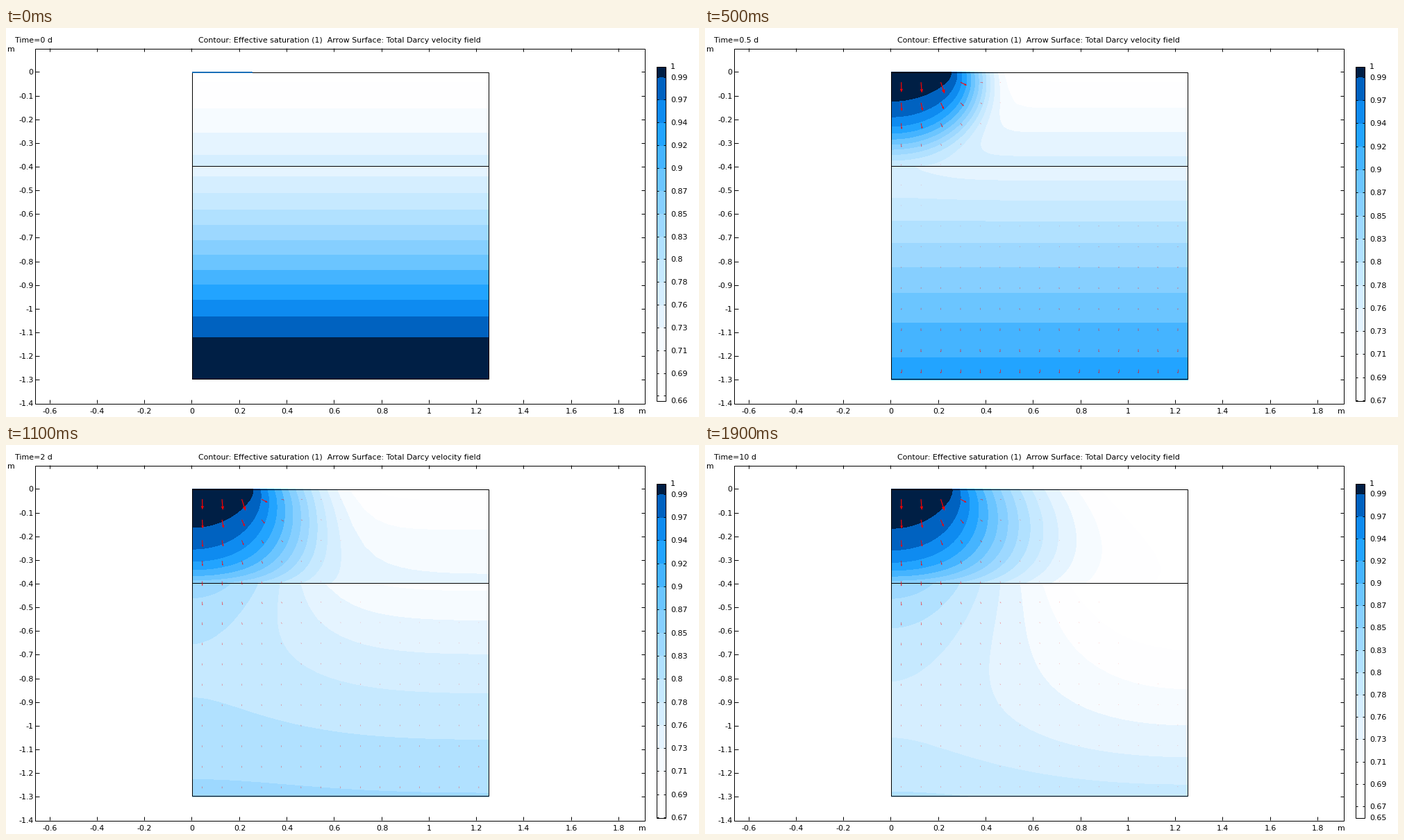
These frames come from a looping animation (998x561 px, 2 s). A matplotlib script:

```python
import numpy as np
import matplotlib
import matplotlib.pyplot as plt
from matplotlib.animation import FuncAnimation
from matplotlib.collections import LineCollection, PolyCollection
from matplotlib.patches import Rectangle

matplotlib.rcParams["font.family"] = "DejaVu Sans"
W, H = 998, 561
X0, Y0, PX = 268.4, 64.4, 341.4          # stage position of the origin, pixels per metre
LEVELS = 0.989 - 0.0231 * np.arange(15)
COLORS = ["#001f45", "#0062c0", "#0e8bf0", "#22a4ff", "#45b4ff", "#6bc5ff", "#86cfff", "#9dd8ff",
          "#b1e1ff", "#c6e9ff", "#d5eeff", "#e5f4ff", "#f6fbff", "#fefeff", "#ffffff", "#ffffff"]
TIMES = np.concatenate([np.arange(11) / 10, np.arange(2, 11)])

# --- variably saturated flow in a two-layer cylinder under a ring of ponded water ---
TOP = 28
dz = np.r_[np.full(TOP, 0.4 / TOP), np.full(24, 0.9 / 24)][:, None]
dr = np.r_[np.full(28, 0.25 / 14), np.full(15, 0.05)]
zf = np.r_[0, np.cumsum(dz[:, 0])]
rf = np.r_[0, np.cumsum(dr)]
zc, rc = (zf[1:] + zf[:-1]) / 2, (rf[1:] + rf[:-1]) / 2
NZ, NR = len(zc), len(rc)
depth = zc[:, None]
area = rc * dr
upper = depth < 0.4
ring = rc < 0.25


def soil(up, low):
    return np.where(upper, up, low)


KS, POR = soil(0.06, 0.19), soil(0.399, 0.339)
ALPHA, N = soil(1.40, 1.39), soil(1.5, 1.6024)
M = 1 - 1 / N
STORE = 0.004


def saturation(h, alpha, n):
    return (1 + (alpha * np.maximum(-h, 0)) ** n) ** (1 / n - 1)


def conductivity(h):
    s = saturation(h, ALPHA, N)
    return KS * np.sqrt(s) * (1 - (1 - s ** (1 / M)) ** M) ** 2


def water(h):
    return POR * saturation(h, ALPHA, N) + STORE * h


def capacity(h):
    a = ALPHA * np.maximum(-h, 0)
    return POR * M * N * ALPHA * a ** (N - 1) * (1 + a ** N) ** (-M - 1) + STORE


def fluxes(h):
    """Face fluxes down and outward, each with its slopes for the cells on both sides."""
    k, head = conductivity(h), h - depth
    dk = (conductivity(h + 0.004) - conductivity(h - 0.004)) / 0.008
    z, za, zb = np.zeros((3, NZ + 1, NR))
    r, ra, rb = np.zeros((3, NZ, NR + 1))

    gap, drop = dz[1:] + dz[:-1], head[:-1] - head[1:]
    t = (k[1:] + k[:-1]) / gap
    z[1:-1], za[1:-1], zb[1:-1] = t * drop, t + dk[:-1] * drop / gap, -t + dk[1:] * drop / gap

    gap, drop = dr[1:] + dr[:-1], head[:, :-1] - head[:, 1:]
    t = (k[:, 1:] + k[:, :-1]) / gap
    r[:, 1:-1], ra[:, 1:-1], rb[:, 1:-1] = t * drop, t + dk[:, :-1] * drop / gap, -t + dk[:, 1:] * drop / gap

    t = (KS[0] + k[0]) / dz[0]
    z[0] = np.where(ring, -t * head[0], 0)
    zb[0] = np.where(ring, -t - dk[0] * head[0] / dz[0], 0)
    leak = 0.066 * (head[-1] + 2.0)
    z[-1] = np.clip(leak, 0, 0.029)
    za[-1] = np.where((leak > 0) & (leak < 0.029), 0.066, 0)
    return z, za, zb, r, ra, rb


def block_solve(diag, left, right, up, down, rhs):
    """Block tridiagonal elimination, one block per row of cells."""
    i = np.arange(NR)
    mat = np.zeros((NZ, NR, NR))
    mat[:, i, i] = diag
    mat[:, i[1:], i[:-1]] = left[:, 1:]
    mat[:, i[:-1], i[1:]] = right[:, :-1]
    x, inv = rhs.copy(), [np.linalg.inv(mat[0])]
    for n in range(1, NZ):
        w = up[n][:, None] * inv[-1]
        x[n] -= w @ x[n - 1]
        inv.append(np.linalg.inv(mat[n] - w * down[n - 1]))
    x[-1] = inv[-1] @ x[-1]
    for n in range(NZ - 2, -1, -1):
        x[n] = inv[n] @ (x[n] - down[n] * x[n + 1])
    return x


def advance(h, dt):
    start = water(h)
    for _ in range(4):
        z, za, zb, r, ra, rb = fluxes(h)
        fz, fr = dt / dz, dt / area
        r, ra, rb = rf * r, rf * ra, rf * rb
        rhs = start - water(h) + fz * (z[:-1] - z[1:]) + fr * (r[:, :-1] - r[:, 1:])
        diag = capacity(h) + fz * (za[1:] - zb[:-1]) + fr * (ra[:, 1:] - rb[:, :-1])
        step = block_solve(diag, -fr * ra[:, :-1], fr * rb[:, 1:], -fz * za[:-1], fz * zb[1:], rhs)
        h = h + np.clip(step, -0.5, 0.5)
    return h


def simulate():
    h = np.repeat(depth - 1.2, NR, axis=1)
    states = [h]
    for span in np.diff(TIMES):
        for _ in range(6):
            h = advance(h, span / 6)
        states.append(h)
    return states


STATES = simulate()


def layers(h):
    """Saturation of both layers, extended to their edges."""
    k, head = conductivity(h), h - depth
    a, b = k[TOP - 1] / dz[TOP - 1], k[TOP] / dz[TOP]
    mid = (a * head[TOP - 1] + b * head[TOP]) / (a + b) + 0.4
    top = np.where(ring, 0, head[0])
    base = 1.5 * h[-1] - 0.5 * h[-2]
    r = np.r_[0, rc, 1.25]
    for rows, z, alpha, n in (([top, *h[:TOP], mid], np.r_[0, zc[:TOP], 0.4], 1.40, 1.5),
                              ([mid, *h[TOP:], base], np.r_[0.4, zc[TOP:], 1.3], 1.39, 1.6024)):
        s = saturation(np.pad(np.array(rows), ((0, 0), (1, 1)), mode="edge"), alpha, n)
        yield X0 + PX * r, Y0 + PX * z, s


def lerp(src, a, dst):
    i = np.clip(np.searchsorted(src, dst) - 1, 0, len(src) - 2)
    w = ((dst - src[i]) / (src[i + 1] - src[i])).clip(0, 1)[:, None]
    return a[i] * (1 - w) + a[i + 1] * w


PR, PZ = (np.arange(15) + 0.5) * 1.25 / 15, (np.arange(15) + 0.5) * 1.3 / 15


def arrows(h):
    """Shafts, heads and widths of the velocity arrows, in pixels."""
    z, _, _, r, _, _ = fluxes(h)
    vy = lerp(rc, lerp(zf, z, PZ).T, PR).T
    vx = lerp(rf, lerp(zc, r, PZ).T, PR).T
    size = np.hypot(vx, vy)
    v = np.stack([vx, vy], -1) * 17.5 / size.max()
    x, y = np.meshgrid(X0 + PX * PR, Y0 + PX * PZ)
    tail = np.stack([x, y], -1)
    length = np.hypot(v[..., 0], v[..., 1])
    keep = length > 0.6
    v, tail, length = v[keep], tail[keep], length[keep]
    tip, neck = tail + v, tail + 0.66 * v
    side = 0.14 * v[:, ::-1] * [-1, 1]
    heads = np.stack([tip, neck + side, neck - side], 1)
    return np.stack([tail, neck], 1), heads, np.clip(length / 10, 0.3, 1.2)


# --- stage ---
DPI = 100
PT = 72 / DPI
fig = plt.figure(figsize=(W / 100, H / 100), dpi=DPI, facecolor="white")
ax = fig.add_axes([0, 0, 1, 1])
ax.set_xlim(0, W)
ax.set_ylim(H + 1, 1)
ax.axis("off")


def text(x, y, s, ha="left"):
    return ax.text(x, y, s, fontsize=11.06 * PT, ha=ha, va="center_baseline")


def line(xs, ys, color="black", lw=1.0, z=5):
    return ax.plot(xs, ys, color=color, lw=lw * PT, zorder=z, solid_capstyle="butt")[0]


def box(x, y, x2, y2):
    ax.add_patch(Rectangle((x, y), x2 - x, y2 - y, fill=False, ec="black", lw=PT, zorder=5))


box(42.5, 30.5, 920.5, 542.5)
for i in range(-14, 2):
    y = round(Y0 - PX * i / 10) + 0.5
    if -14 < i < 1:
        line([42, 48], [y, y])
        line([915, 920], [y, y])
    if i < 1:
        text(39.5, y - 0.5, f"{i / 10:g}", "right")
for i in range(-3, 10):
    x = round(X0 + PX * i / 5) - 0.5
    line([x, x], [30, 35])
    line([x, x], [537, 542])
    text(x, 553, f"{i / 5:g}", "center")
text(2, 31, "m")
text(911.5, 553, "m")
text(277, 18, "Contour: Effective saturation (1)  Arrow Surface: Total Darcy velocity field")
box(268.5, 64.5, 695.5, 507.5)
line([268, 695], [200.5, 200.5])

clock = text(13, 18, "")
pond = line([268, 355], [65, 65], "#1a6fb8", 2, 6)
shafts = ax.add_collection(LineCollection([], colors="red", zorder=7))
heads = ax.add_collection(PolyCollection([], facecolors="red", edgecolors="none", zorder=7))

BX, BY, BX2, BY2 = 937.5, 56.5, 950.5, 538.5
cells = [ax.add_patch(Rectangle((BX, BY), BX2 - BX, 1, fc=c, ec="none", zorder=3, antialiased=False))
         for c in COLORS]
marks = [line([], []) for _ in range(2 * len(LEVELS))]
labels = [text(957, 0, "") for _ in range(len(LEVELS) + 2)]
box(BX, BY, BX2, BY2)
fills = []


def number(v):
    return f"{v:.2f}".rstrip("0").rstrip(".")


def draw_bar(t):
    if t == 0:
        low = 0.661
    else:
        low = LEVELS[-1] - 0.0115 * max(0, t - 6) / 4
    values = np.r_[1, LEVELS, low]
    ys = BY + (BY2 - BY) * (1 - values) / (1 - low)
    for cell, y, y2 in zip(cells, ys, ys[1:]):
        cell.set_y(y)
        cell.set_height(y2 - y)
    for i, y in enumerate(np.floor(ys[1:-1]) + 0.5):
        marks[2 * i].set_data([BX, BX + 3], [y, y])
        marks[2 * i + 1].set_data([BX2 - 3, BX2], [y, y])
    for i, label in enumerate(labels):
        crowded = i == len(LEVELS) and ys[-1] - ys[i] < 12
        label.set_text("" if crowded else number(values[i]))
        label.set_y(ys[i] - 0.5)


def update(frame):
    t, h = TIMES[frame], STATES[frame]
    while fills:
        fills.pop().remove()
    edges = np.r_[0, LEVELS[::-1], 1.1]
    for x, y, s in layers(h):
        if frame == 0:
            s[0] = s[1]
        fills.append(ax.contourf(x, y, s, levels=edges, colors=COLORS[::-1], zorder=2, antialiased=False))
    clock.set_text(f"Time={t:g} d")
    pond.set_visible(frame == 0)
    if frame:
        segs, tris, widths = arrows(h)
    else:
        segs, tris, widths = [], [], [1]
    shafts.set_segments(segs)
    shafts.set_linewidths(np.array(widths) * PT)
    heads.set_verts(tris)
    draw_bar(t)
    return []


anim = FuncAnimation(fig, update, frames=len(TIMES), init_func=lambda: [], interval=100,
                     repeat=True, repeat_delay=0, blit=False)
plt.show()
```
